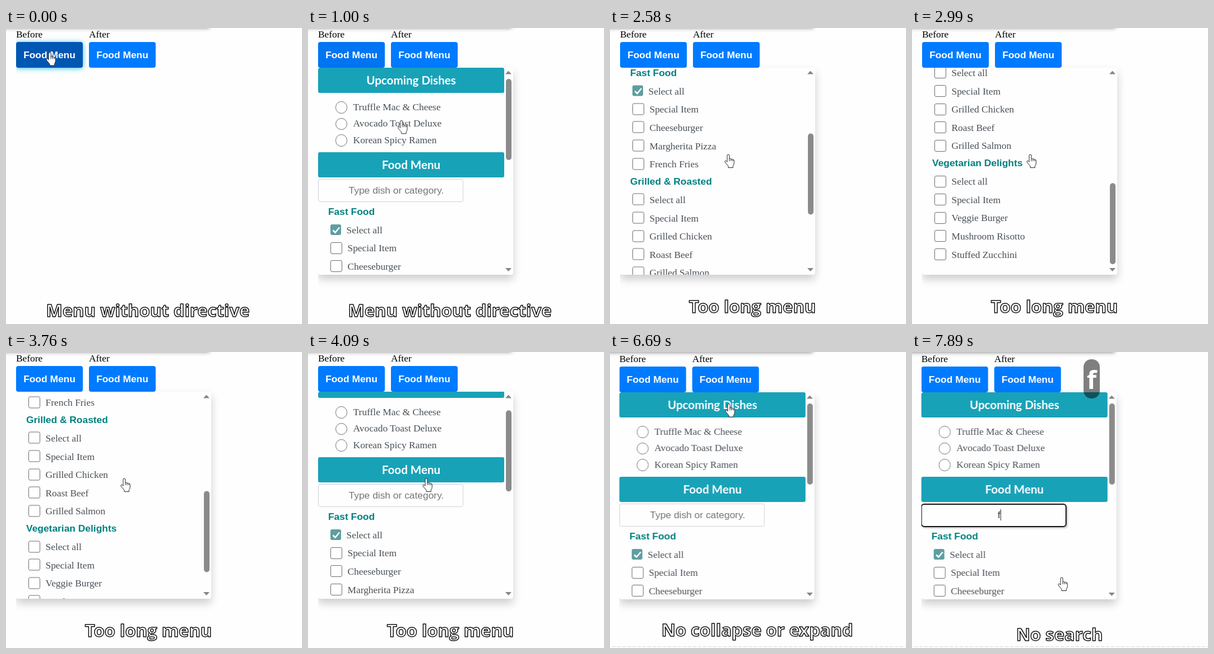
An HTML page that plays this animation: 528 px wide and 529 px high, repeating every 8 s.

```html
<!DOCTYPE html>
<html lang="en">
<head>
<meta charset="utf-8">
<title>Food menu walkthrough</title>
<style>
@property --scroll { syntax: "<number>"; inherits: true; initial-value: 0; }

html, body { margin: 0; width: 100%; height: 100%; overflow: hidden; background: #fefefe; }
.stage { position: relative; width: 528px; height: 529px; overflow: hidden; }
.stage * { box-sizing: border-box; }
.abs, .page, .clip, .stage svg { position: absolute; }
.anim { animation: 8s step-end infinite; }

.page { inset: 0; animation-name: shift; }
.bar { left: -30px; top: -42px; width: 393px; height: 40px; box-shadow: 0 2px 7px rgba(0,0,0,.45); }
.dash { left: 4px; top: 526px; width: 524px; height: 1px; animation-name: dash;
  background: repeating-linear-gradient(90deg, #d6d6d6 0 6px, transparent 6px 9px); }
.clip { left: 18px; top: 0; width: 510px; height: 529px; overflow: hidden;
  font: 17.4px/22px "Liberation Serif", "Times New Roman", serif; }

.btn { top: 25px; width: 119px; height: 46px; border-radius: 4px; background: #007bff; color: #fff;
  font: bold 17.4px/46px "Liberation Sans", Arial, sans-serif; text-align: center; white-space: nowrap; }
.first { animation: hover 8s linear infinite; }

.menu { left: 0; top: 71px; width: 348px; height: 370px; border-radius: 4px; background: #fefefe;
  box-shadow: 0 8px 16px rgba(0,0,0,.2); animation-name: open; }
.view { inset: 0; overflow: hidden; border-radius: 4px; color: #495057;
  animation: scroll 8s linear infinite; }
.list { inset: 0 16px auto 0; height: 845px; transform: translateY(calc(var(--scroll) * -1px)); }
.thumb { left: 335px; top: 19.5px; width: 9.5px; height: 145px; border-radius: 5px; background: #8b8b8b;
  transform: translateY(calc(var(--scroll) * .392px)); }
.arrow { left: 334px; width: 11px; height: 6px; background: #858585; }
.up { top: 5.5px; clip-path: polygon(50% 0, 100% 100%, 0 100%); }
.down { top: 358px; clip-path: polygon(0 0, 100% 0, 50% 100%); }

.head { left: 0; width: 332px; height: 45px; border-radius: 3px; background: #18a2b8; color: #fff;
  font: bold 20.6px/45px Lato, "Open Sans", sans-serif; text-align: center; }
.radios { left: 30.5px; top: 55px; }
.radios div { display: flex; height: 29.6px; align-items: center; white-space: nowrap; }
.radios div::before { content: ""; width: 19.5px; height: 19.5px; margin: 2px 10.6px 0 0;
  border: 1.3px solid #6c6c6c; border-radius: 50%; background: #fff; }
.field { left: 0; top: 198.5px; width: 259px; height: 41px; border: 1px solid #ced4da; border-radius: 4px;
  color: #757575; font: 17.4px/39px "Liberation Sans", Arial, sans-serif; text-align: center; padding-left: 20px; }
.focus { left: -1.5px; top: 198.5px; width: 260.5px; height: 42px; border: 2px solid #101010; border-radius: 6px;
  box-shadow: 2px 2px 3px rgba(0,0,0,.22); animation-name: focus; }
.hint { animation-name: hint; }
.typed { left: 136px; top: 209px; height: 20px; padding-right: .5px; border-right: 1px solid #222; color: #333;
  font: 17.4px/20px "Liberation Sans", Arial, sans-serif; animation-name: typed; }
.groups { left: 18px; top: 242.3px; }
.groups h3 { margin: -1.6px 0 0; color: #008080; white-space: nowrap;
  font: bold 17.4px/32.8px "Liberation Sans", Arial, sans-serif; }
.groups p { display: flex; align-items: center; height: 32.6px; margin: 0 0 0 4px; white-space: nowrap; }
.groups p::before { content: ""; width: 19px; height: 19px; margin-right: 9.5px; flex: none;
  border: 1.3px solid #6c6c6c; border-radius: 3px; background: #fff; }
.groups p.on::before { border: 0; background: #5f9ea0; }
.tick { left: 21.5px; top: 279.8px; }

.caption { left: 0; top: 0; width: 528px; height: 529px; overflow: visible; }
.caption text { font: 700 31px "Open Sans", "Noto Sans", sans-serif; text-anchor: middle;
  fill: #fff; stroke: #111; stroke-width: 1.5px; stroke-linejoin: round; }
.c1 { animation-name: c1; } .c2 { animation-name: c2; }
.c3 { animation-name: c3; } .c4 { animation-name: c4; }

.key { left: 306px; top: 13px; width: 29px; height: 70px; border-radius: 14px; background: rgba(0,0,0,.5);
  color: #fff; font: 700 45px/70px "Open Sans", "Noto Sans", sans-serif; text-align: center; animation-name: typed; }
.key span { position: relative; top: 1px; }
.hand { left: -8px; top: -1.5px; width: 19px; height: 26px; overflow: visible; animation: move 8s linear infinite; }
.click { width: 27px; height: 27px; border-radius: 50%; background: rgba(255,255,0,.47); }
.k1 { left: 64px; top: 31px; animation-name: k1; }
.k2 { left: 176.5px; top: 86px; animation-name: k2; }

@keyframes shift { 0% { transform: none } 66.875%, 100% { transform: translate(-1.3px, 1px) } }
@keyframes dash { 0% { opacity: 0 } 66.875%, 100% { opacity: 1 } }
@keyframes open { 0% { opacity: 0 } 4.125%, 100% { opacity: 1 } }
@keyframes hover {
  0%, 9.875% { background: #0056b3; box-shadow: 0 1px 10px rgba(0,175,235,.8) }
  13%, 100% { background: #007bff; box-shadow: 0 1px 10px rgba(0,175,235,0) }
}
@keyframes scroll {
  0% { --scroll: 0 }
  25.5% { --scroll: 0; animation-timing-function: steps(4, start) }
  29.95% { --scroll: 173 }
  31.375% { --scroll: 173; animation-timing-function: steps(8, start) }
  38.2% { --scroll: 475 }
  46.125% { --scroll: 475; animation-timing-function: steps(6, start) }
  51.87% { --scroll: 34; animation-timing-function: steps(2, start) }
  53.5%, 100% { --scroll: 0 }
}
@keyframes move {
  0% { transform: translate(79px, 43.5px) }
  9.875% { transform: translate(79px, 43.5px); animation-timing-function: steps(6, start) }
  15.1% { transform: translate(212px, 226px) }
  65.25% { transform: translate(212px, 226px); animation-timing-function: steps(1, start) }
  66.1% { transform: translate(213px, 212.5px); animation-timing-function: steps(4, start) }
  69.45% { transform: translate(191.5px, 98px) }
  83.625% { transform: translate(191.5px, 98px); animation-timing-function: steps(1, start) }
  84.5% { transform: translate(213px, 92.5px); animation-timing-function: steps(5, start) }
  88.85% { transform: translate(200px, 284px) }
  94.25% { transform: translate(200px, 284px); animation-timing-function: steps(6, start) }
  99.45%, 100% { transform: translate(268px, 403px) }
}
@keyframes focus { 0% { opacity: 0 } 91.75%, 100% { opacity: 1 } }
@keyframes hint { 0% { opacity: 1 } 98.6%, 100% { opacity: 0 } }
@keyframes typed { 0% { opacity: 0 } 98.6%, 100% { opacity: 1 } }
@keyframes c1 { 0% { opacity: 1 } 25.5%, 100% { opacity: 0 } }
@keyframes c2 { 0%, 65.25%, 100% { opacity: 0 } 25.5% { opacity: 1 } }
@keyframes c3 { 0%, 84.5%, 100% { opacity: 0 } 66.875% { opacity: 1 } }
@keyframes c4 { 0% { opacity: 0 } 94.25%, 100% { opacity: 1 } }
@keyframes k1 { 0%, 4.125%, 100% { opacity: 0 } .875% { opacity: 1 } }
@keyframes k2 {
  0%, 73.625%, 78.625%, 83.625%, 100% { opacity: 0 }
  71.125%, 76.125%, 81.125% { opacity: 1 }
}
</style>
</head>
<body>
<div class="stage">
  <div class="page anim">
    <div class="abs bar"></div>
    <div class="clip">
      <div class="abs" style="left:0;top:0">Before</div>
      <div class="abs" style="left:130px;top:0">After</div>
      <div class="abs btn first">Food Menu</div>
      <div class="abs btn" style="left:130px">Food Menu</div>
      <div class="abs menu anim">
        <div class="abs view">
          <div class="abs list">
            <div class="abs head" style="top:0">Upcoming Dishes</div>
            <div class="abs radios">
              <div>Truffle Mac &amp; Cheese</div>
              <div>Avocado Toast Deluxe</div>
              <div>Korean Spicy Ramen</div>
            </div>
            <div class="abs head" style="top:150.7px">Food Menu</div>
            <div class="abs field"><span class="hint anim">Type dish or category.</span></div>
            <div class="abs focus anim"></div>
            <div class="abs typed anim">f</div>
            <div class="abs groups">
              <h3>Fast Food</h3>
              <p class="on">Select all</p><p>Special Item</p><p>Cheeseburger</p><p>Margherita Pizza</p><p>French Fries</p>
              <h3>Grilled &amp; Roasted</h3>
              <p>Select all</p><p>Special Item</p><p>Grilled Chicken</p><p>Roast Beef</p><p>Grilled Salmon</p>
              <h3>Vegetarian Delights</h3>
              <p>Select all</p><p>Special Item</p><p>Veggie Burger</p><p>Mushroom Risotto</p><p>Stuffed Zucchini</p>
            </div>
            <svg class="tick" width="20" height="20"><path d="M4.5 10.5l4 4 7.5-9" fill="none" stroke="#fff" stroke-width="2.6"/></svg>
          </div>
          <div class="abs thumb"></div>
          <div class="abs arrow up"></div>
          <div class="abs arrow down"></div>
        </div>
      </div>
    </div>
  </div>
  <div class="abs dash anim"></div>

  <svg class="caption" viewBox="0 0 528 529">
    <text class="c1 anim" x="253" y="516.4">Menu without directive</text>
    <text class="c2 anim" x="254" y="508.8">Too long menu</text>
    <text class="c3 anim" x="262.6" y="508">No collapse or expand</text>
    <text class="c4 anim" x="263" y="515.8">No search</text>
  </svg>

  <div class="abs key anim"><span>f</span></div>
  <svg class="hand" viewBox="0 0 19 26">
    <g stroke="#222" stroke-linejoin="round">
      <path fill="#fff" d="M5 14V3a2 2 0 0 1 4 0V8.6q2-.9 3 .8q2-.8 3 .8q2.2-.6 2.3 1.8V16.4q0 3-2 5.3V24.6H7V21.9L1.2 15q-1-2 .6-2.8q1.4-.4 3.2 2.2Z"/>
      <path fill="none" d="M9 8.6V13M12 9.4V13M15 10.2V13"/>
    </g>
  </svg>
  <div class="abs click k1 anim"></div>
  <div class="abs click k2 anim"></div>
</div>
</body>
</html>
```
